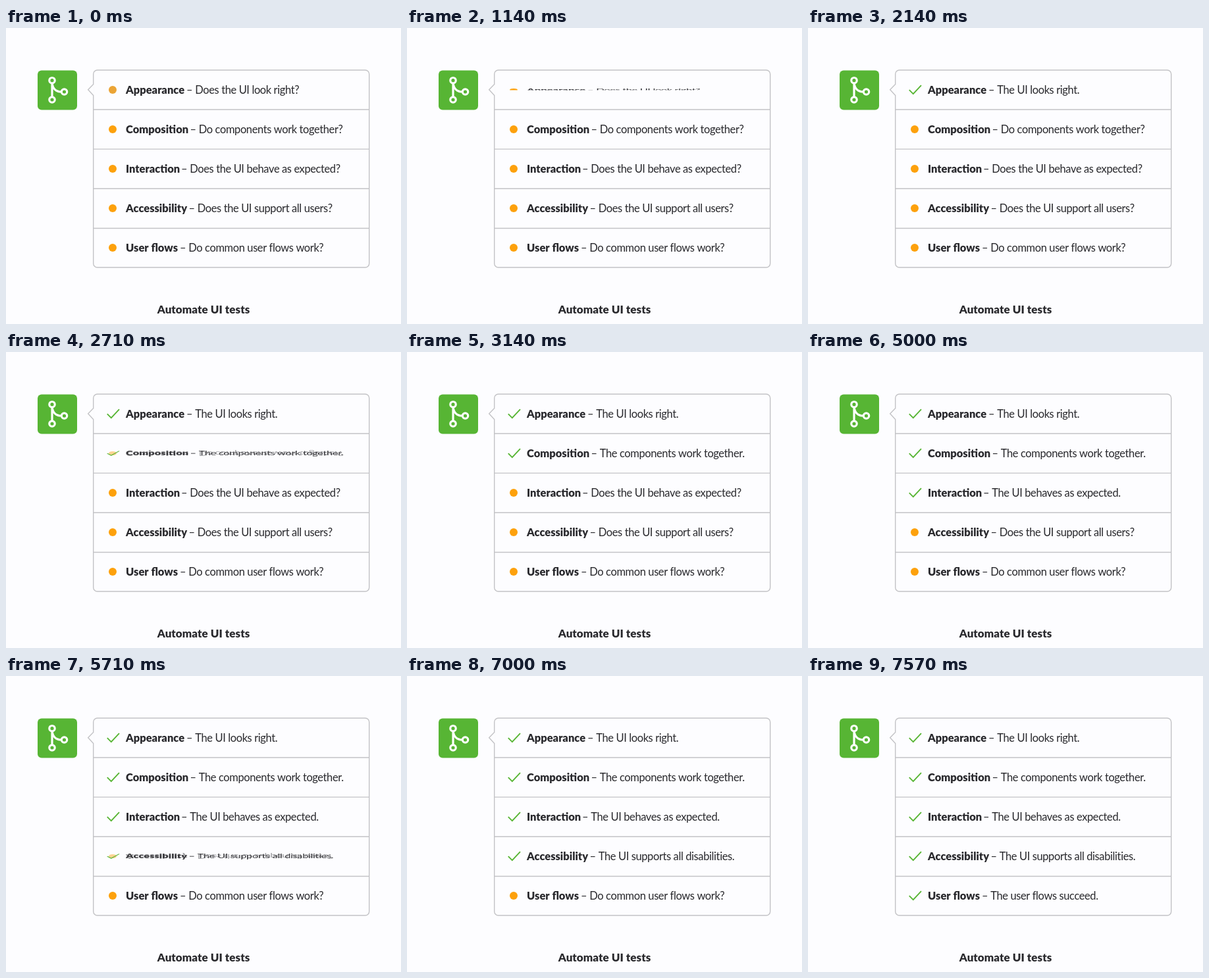
Animation of 600x450 px, one loop 8 s. Source, as an HTML page with a canvas:

```html
<!DOCTYPE html>
<html lang="en">
<head>
<meta charset="utf-8">
<title>Automate UI tests</title>
<style>
  html, body { margin: 0; width: 100%; height: 100%; overflow: hidden; background: #fdfdff; }
  canvas { display: block; }
</style>
</head>
<body>
<canvas id="stage" width="600" height="450"></canvas>
<script>
const ctx = document.getElementById('stage').getContext('2d');
const LOOP = 8000, FIRST_FLIP = 1030, FLIP_GAP = 1500, FLIP_TIME = 460;
const INK = '#29292d', BORDER = '#c3c3c6', GREEN = '#57b534', BACK = '#fdfdff';

const rows = [
  { title: 'Appearance', dashX: 275, ask: 'Does the UI look right?', done: 'The UI looks right.' },
  { title: 'Composition', dashX: 280.5, ask: 'Do components work together?', done: 'The components work together.' },
  { title: 'Interaction', dashX: 267, ask: 'Does the UI behave as expected?', done: 'The UI behaves as expected.' },
  { title: 'Accessibility', dashX: 278.5, ask: 'Does the UI support all users?', done: 'The UI supports all disabilities.' },
  { title: 'User flows', dashX: 265, ask: 'Do common user flows work?', done: 'The user flows succeed.' }
];

const clamp = v => Math.max(0, Math.min(1, v));

// Cubic Bezier (.25, .1) (.25, 1), solved by bisection.
function ease(x) {
  const curve = (s, a, b) => 3 * a * s * (1 - s) ** 2 + 3 * b * s * s * (1 - s) + s ** 3;
  let low = 0, high = 1;
  for (let i = 0; i < 20; i++) {
    const mid = (low + high) / 2;
    if (curve(mid, .25, .25) < x) low = mid; else high = mid;
  }
  return curve(low, .1, 1);
}

function text(str, x, y, weight, size, spacing, align = 'left') {
  ctx.font = `${weight} ${size}px Lato, "Open Sans", sans-serif`;
  ctx.letterSpacing = spacing + 'px';
  ctx.textAlign = align;
  ctx.fillStyle = INK;
  ctx.fillText(str, x, y);
}

function stroke(points, color, width) {
  ctx.beginPath();
  points.forEach(([x, y]) => ctx.lineTo(x, y));
  ctx.strokeStyle = color;
  ctx.lineWidth = width;
  ctx.stroke();
}

function disc(x, y, r) {
  ctx.beginPath();
  ctx.arc(x, y, r, 0, Math.PI * 2);
}

function mergeTile() {
  ctx.fillStyle = GREEN;
  ctx.beginPath();
  ctx.roundRect(48, 64.5, 60, 60, 6);
  ctx.fill();
  ctx.strokeStyle = '#fff';
  ctx.lineWidth = 3.2;
  ctx.beginPath();
  ctx.moveTo(70, 84);
  ctx.lineTo(70, 105);
  ctx.moveTo(70, 84);
  ctx.bezierCurveTo(71, 92, 76, 97, 84, 97);
  ctx.stroke();
  for (const [x, y] of [[70, 79.7], [70, 109], [88.5, 97]]) {
    disc(x, y, 4.2);
    ctx.stroke();
  }
}

function panel() {
  ctx.strokeStyle = BORDER;
  ctx.lineWidth = 1.4;
  ctx.beginPath();
  ctx.roundRect(132.7, 64, 419, 300, 6);
  ctx.stroke();
  for (let i = 0; i < 4; i++) {
    const y = 124 + i * 60.15;
    stroke([[133, y], [552, y]], BORDER, 1.4);
  }
  stroke([[132.7, 86], [132.7, 102]], BACK, 2.4);
  stroke([[132.7, 85.5], [124.7, 93.8], [132.7, 102.5]], BORDER, 1.4);
}

function face(row, done, dotColor) {
  if (done) {
    stroke([[153.8, .2], [159.8, 6.2], [172, -6.8]], GREEN, 1.9);
  } else {
    disc(162, 0, 6);
    ctx.fillStyle = dotColor;
    ctx.fill();
  }
  text(row.title, 182, 5.7, 900, 16.5, 0);
  text('–', row.dashX - 1, 5.7, 400, 16.5, 0);
  text(done ? row.done : row.ask, row.dashX + 12.3, 5.7, 400, 16.5, -.4);
}

function drawRow(row, index, time) {
  const p = ease(clamp((time - FIRST_FLIP - index * FLIP_GAP) / FLIP_TIME));
  const tilt = Math.cos(Math.PI * p);
  const fade = index ? 1 : clamp(time / 570);
  const dotColor = `rgb(${235 + 18 * fade}, ${164 - 3 * fade}, ${54 - 42 * fade})`;

  ctx.save();
  ctx.translate(0, 94 + index * 60);
  // The half leaning backwards disappears behind the panel.
  if (p > .001 && p < .5) {
    ctx.beginPath();
    ctx.rect(134, -29, 417, 29.5);
    ctx.clip();
  }
  const side = (done, scale, alpha) => {
    if (alpha <= 0) return;
    ctx.save();
    ctx.globalAlpha = alpha;
    ctx.scale(1, scale);
    face(row, done, dotColor);
    ctx.restore();
  };
  side(false, tilt, clamp(1 - (p - .5) * 3.2));
  side(true, -tilt, clamp((p - .45) * 4));
  ctx.restore();
}

function draw(now) {
  const time = now % LOOP;
  ctx.fillStyle = BACK;
  ctx.fillRect(0, 0, 600, 450);
  mergeTile();
  panel();
  rows.forEach((row, i) => drawRow(row, i, time));
  text('Automate UI tests', 300, 433.5, 900, 17, .05, 'center');
}

const start = performance.now();
function tick() {
  draw(performance.now() - start);
  requestAnimationFrame(tick);
}
tick();
</script>
</body>
</html>
```
